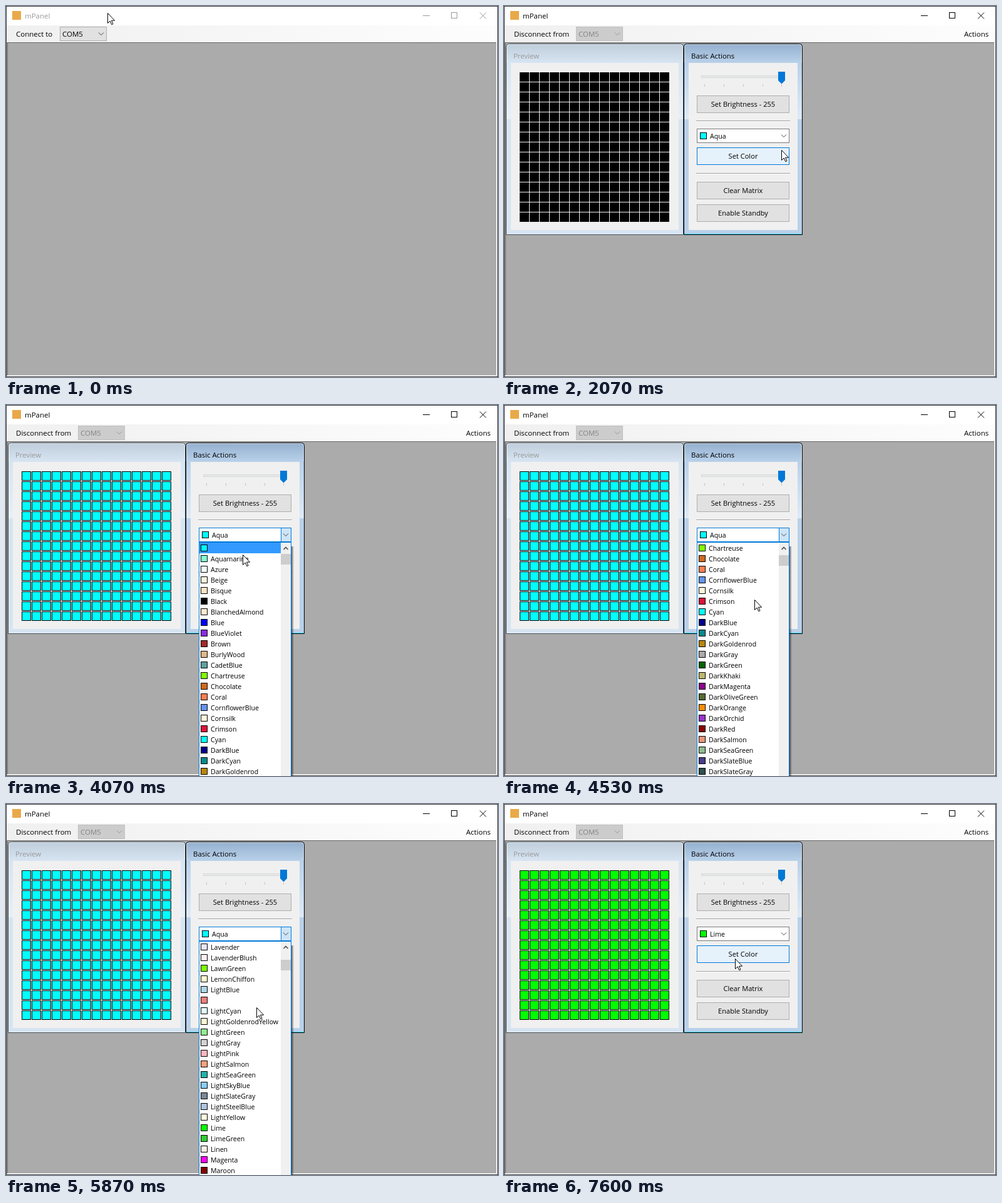
An HTML page for the animation above (8 s loop, 786 by 593 pixels).

```html
<!DOCTYPE html>
<html lang="en">
<head>
<meta charset="utf-8">
<title>mPanel</title>
<style>
html, body { margin: 0; width: 100%; height: 100%; overflow: hidden; background: #ababab; }
svg { display: block; }
body > svg { position: absolute; left: 0; top: 0; }
#drop { left: 308px; top: 219px; }
text { font: 11.5px "Open Sans", "Noto Sans", sans-serif; white-space: pre; }
.btn { font-size: 11.1px; text-anchor: middle; }
.item { font-size: 10.6px; }
.crisp, rect { shape-rendering: crispEdges; }
.line { fill: none; stroke: #444; }

.anim, #pointer, #drop { animation: 8s step-end infinite; }
#caption { animation-name: caption; }
#hover { animation-name: hover; }
#idle { animation-name: idle; }
#ghostB { animation-name: ghostB; }
#ghostA { animation-name: ghostA; }
#live { animation-name: live; }
#leds { animation-name: leds; }
#setColor { animation-name: press; }
#combo { animation-name: combo; }
#arrow { animation-name: arrow; }
#pick { animation-name: pick; }
#oldName { animation-name: oldName; }
#newName { animation-name: newName; }
#drop { animation-name: drop; }
#rows { animation-name: rows; }
#thumb { animation-name: thumb; }
#mark { animation-name: mark; }
#pointer { animation-name: pointer; }

@keyframes caption { 0% { color: #999 } 15.833%, 100% { color: #000 } }
@keyframes hover { 0% { opacity: 0 } 5.833%, 100% { opacity: 1 } }
@keyframes idle { 0% { opacity: 1 } 19.125%, 100% { opacity: 0 } }
@keyframes ghostB { 0% { opacity: 0 } 16.667% { opacity: 1 } 19.125%, 100% { opacity: 0 } }
@keyframes ghostA { 0% { opacity: 0 } 17.4% { opacity: 1 } 19.125%, 100% { opacity: 0 } }
@keyframes live { 0% { opacity: 0 } 19.125%, 100% { opacity: 1 } }
@keyframes leds { 0% { fill: #000 } 37.4% { fill: #0ff } 94.9%, 100% { fill: #0f0 } }
@keyframes press {
  0%, 83.333% { fill: #e1e1e1; stroke: #adadad }
  25.833%, 37.4%, 91.6%, 94.9%, 100% { fill: #e5f1fb; stroke: #0078d7 }
  35.833%, 94.1% { fill: #cce4f7; stroke: #005499 }
  41.667% { fill: #e1e1e1; stroke: #0078d7 }
}
@keyframes combo { 0%, 83.333%, 100% { stroke: #7a7a7a } 42.5% { stroke: #0078d7 } }
@keyframes arrow { 0%, 83.333%, 100% { opacity: 0 } 45% { opacity: 1 } }
@keyframes pick { 0% { fill: #0ff } 83.333%, 100% { fill: #0f0 } }
@keyframes oldName { 0% { opacity: 1 } 83.333%, 100% { opacity: 0 } }
@keyframes newName { 0% { opacity: 0 } 83.333%, 100% { opacity: 1 } }
@keyframes drop {
  0%, 83.333%, 100% { clip-path: inset(0 0 100% 0) }
  44.167% { clip-path: inset(0 0 100% 0); animation-timing-function: steps(5) }
  48.333% { clip-path: inset(0 0 0% 0) }
}
@keyframes rows {
  0% { transform: translateY(0) }
  52.5% { transform: translateY(0); animation-timing-function: steps(10) }
  60.833% { transform: translateY(-510px) }
  64.167% { transform: translateY(-510px); animation-timing-function: steps(9) }
  70%, 100% { transform: translateY(-969px) }
}
@keyframes thumb {
  0% { transform: translateY(0) }
  52.5% { transform: translateY(0); animation-timing-function: steps(5) }
  60.833% { transform: translateY(5px) }
  64.167% { transform: translateY(5px); animation-timing-function: steps(6) }
  70%, 100% { transform: translateY(11px) }
}
@keyframes mark {
  0% { transform: translateY(0); fill: #39f }
  51.667% { transform: translateY(51px); fill: #39f }
  52.5% { transform: translateY(85px); fill: #39f }
  73.333% { transform: translateY(1054px); fill: #fff }
  74.167% { transform: translateY(1088px); fill: #39f }
  75% { transform: translateY(1105px); fill: #39f }
  75.833% { transform: translateY(1139px); fill: #39f }
  76.667% { transform: translateY(1156px); fill: #39f }
  77.5% { transform: translateY(1190px); fill: #39f }
  78.333% { transform: translateY(1207px); fill: #39f }
  79.167% { transform: translateY(1224px); fill: #39f }
  80%, 100% { transform: translateY(1258px); fill: #39f }
}
@keyframes pointer {
  0% { transform: translate(162px, 11px); animation-timing-function: steps(6) }
  5% { transform: translate(88px, 34px); animation-timing-function: steps(6) }
  10% { transform: translate(45px, 47px) }
  18.333% { transform: translate(45px, 47px); animation-timing-function: steps(9) }
  25.833% { transform: translate(443px, 230px); animation-timing-function: steps(4) }
  29.167% { transform: translate(338px, 232px); animation-timing-function: steps(2) }
  30.833% { transform: translate(351px, 238px) }
  39.167% { transform: translate(351px, 238px); animation-timing-function: steps(6) }
  44.167% { transform: translate(440px, 208px) }
  50.833% { transform: translate(378px, 239px); animation-timing-function: steps(3) }
  53.333% { transform: translate(400px, 311px) }
  73.333% { transform: translate(400px, 325px); animation-timing-function: steps(8) }
  80% { transform: translate(398px, 511px) }
  82.5% { transform: translate(398px, 511px); animation-timing-function: steps(6) }
  87.5% { transform: translate(388px, 330px); animation-timing-function: steps(5) }
  91.667%, 100% { transform: translate(369px, 247px) }
}
</style>
</head>
<body>
<svg id="stage" width="786" height="593"></svg>
<svg id="drop" width="152" height="374"></svg>
<svg id="pointer" width="14" height="21">
  <path d="M.5 .5V16.5L4.2 13L6.8 18.7L9 17.7L6.5 12.2H11.6Z" fill="#fff" stroke="#000"/>
</svg>
<script>
const names = `Aqua Aquamarine Azure Beige Bisque Black BlanchedAlmond Blue BlueViolet Brown
  BurlyWood CadetBlue Chartreuse Chocolate Coral CornflowerBlue Cornsilk Crimson Cyan DarkBlue
  DarkCyan DarkGoldenrod DarkGray DarkGreen DarkKhaki DarkMagenta DarkOliveGreen DarkOrange
  DarkOrchid DarkRed DarkSalmon DarkSeaGreen DarkSlateBlue DarkSlateGray DarkTurquoise DarkViolet
  DeepPink DeepSkyBlue DimGray DodgerBlue Firebrick FloralWhite ForestGreen Fuchsia Gainsboro
  GhostWhite Gold Goldenrod Gray Green GreenYellow Honeydew HotPink IndianRed Indigo Ivory Khaki
  Lavender LavenderBlush LawnGreen LemonChiffon LightBlue LightCoral LightCyan
  LightGoldenrodYellow LightGreen LightGray LightPink LightSalmon LightSeaGreen LightSkyBlue
  LightSlateGray LightSteelBlue LightYellow Lime LimeGreen Linen Magenta Maroon`.split(/\s+/);

const rect = (x, y, w, h, fill, extra = '') =>
  `<rect x="${x}" y="${y}" width="${w}" height="${h}" fill="${fill}" ${extra}/>`;
// Box with a one pixel border inside the given bounds
const box = (x, y, w, h, fill, stroke, extra = '') =>
  rect(x + .5, y + .5, w - 1, h - 1, fill, `stroke="${stroke}" ${extra}`);
const label = (x, y, s, extra = '') => `<text x="${x}" y="${y}" ${extra}>${s}</text>`;
const chevron = (x, y, color = '#444') =>
  `<path class="line" d="M${x} ${y}l4 4l4 -4" style="stroke:${color}"/>`;
const button = (y, s, extra) =>
  box(308, y, 148, 28, '#e1e1e1', '#adadad', extra) + label(382, y + 18, s, 'class="btn"');
const rule = y => rect(307, y, 150, 1, '#a0a0a0') + rect(307, y + 1, 150, 1, '#fff');

const shade = (id, top, mid, light) => `<linearGradient id="${id}" x2="0" y2="1">
  <stop stop-color="${top}"/><stop offset=".1" stop-color="${mid}"/>
  <stop offset=".395" stop-color="${light}"/><stop offset=".395" stop-color="${mid}"/>
  <stop offset="1" stop-color="${mid}"/></linearGradient>`;

// Child window; without a client colour the inside stays see-through
function child(x, y, w, title, active, client) {
  const edge = (i, h) => `M${i} ${h}V${5 + i}q0 -5 5 -5H${w - 5 - i}q5 0 5 5V${h}Z`;
  return `<g transform="translate(${x} ${y})">
    <path fill-rule="evenodd" fill="url(#${active ? 'on' : 'off'})"
      d="${edge(0, 306)}M8 31V298H${w - 8}V31Z"/>
    <path d="M1.5 30V6.5q0 -5 5 -5H${w - 6.5}q5 0 5 5V30" fill="none" stroke="#fff" opacity=".6"/>
    ${rect(1, 304, w - 2, 1, active ? '#2fd6f5' : '#e4eef8')}
    <path d="${edge(.5, 305.5)}" fill="none" stroke="${active ? '#000' : '#434e54'}"/>
    ${client ? rect(8, 31, w - 16, 267, client) : ''}
    ${label(12, 24, title, `fill="${active ? '#000' : '#999'}" style="font-size:11.4px"`)}
  </g>`;
}

const ticks = [320, 351, 382, 413, 443].map(x => rect(x, 125, 1, 4, '#c4c4c4')).join('');

const basicActions = child(287, 60, 190, 'Basic Actions', true, '#f0f0f0') +
  box(315, 111, 129, 4, '#e7eaea', '#d6d6d6') + ticks +
  '<path d="M438 105h11v14l-5.5 5.5l-5.5 -5.5z" fill="#0078d7"/>' +
  button(143, 'Set Brightness - 255') + rule(183) +
  box(308, 196, 148, 23, '#fff', '#7a7a7a', 'id="combo" class="anim"') +
  `<g id="arrow" class="anim">${box(439, 196, 17, 23, '#cce4f7', '#0078d7')}</g>` +
  chevron(443, 205.5) +
  box(313, 202, 11, 11, '#0ff', '#000', 'id="pick" class="anim"') +
  label(329, 212, 'Aqua', 'id="oldName" class="item anim"') +
  label(329, 212, 'Lime', 'id="newName" class="item anim"') +
  button(226, 'Set Color', 'id="setColor" class="anim"') + rule(267) +
  button(281, 'Clear Matrix') + button(317, 'Enable Standby');

stage.innerHTML = `<defs>
    ${shade('on', '#93afce', '#b9d1ea', '#deeaf7')}
    ${shade('off', '#bfcddb', '#d7e4f2', '#e8f0f8')}
    <linearGradient id="bar"><stop stop-color="#f0f0f0"/><stop offset="1" stop-color="#fdfdfd"/></linearGradient>
    <pattern id="cells" x="25" y="106" width="16" height="16" patternUnits="userSpaceOnUse">
      ${box(0, 0, 15, 15, 'none', '#000')}
    </pattern>
  </defs>` +
  box(0, 0, 786, 593, '#fff', '#3c3c3c') +
  rect(10, 8, 14, 14, '#e9a94a') +
  `<g id="caption" class="anim">
    ${label(30, 20, 'mPanel', 'fill="currentColor"')}
    <path class="crisp" d="M666 15.5h11M711.5 10.5h9v9h-9z" fill="none" stroke="currentColor"/>
    <path d="M757 10.5l10 10m0 -10l-10 10" fill="none" stroke="currentColor"/>
  </g>` +
  rect(1, 31, 784, 27, 'url(#bar)') +
  rect(1, 58, 784, 534, '#fff') + rect(1, 58, 783, 533, '#a0a0a0') +
  rect(2, 58, 782, 533, '#e3e3e3') + rect(2, 58, 781, 532, '#696969') +
  rect(3, 59, 780, 531, '#ababab') +
  `<g id="idle" class="anim">
    <g id="hover" class="anim">${box(7, 33, 78, 23, '#c0ddf5', '#0078d7')}</g>
    ${label(16, 49, 'Connect to')}
    ${box(86, 33, 75, 23, '#e1e1e1', '#adadad')}
    ${label(90, 49, 'COM5')}${chevron(148, 42.5)}
  </g>
  <g id="ghostB" class="anim">${child(55, 112, 284, 'Preview', true)}</g>
  <g id="ghostA" class="anim">${child(3, 60, 284, 'Preview', true)}</g>
  <g id="live" class="anim">
    ${label(16, 49, 'Disconnect from')}
    ${box(115, 33, 75, 23, '#ccc', '#bfbfbf')}
    ${label(119, 49, 'COM5', 'fill="#838383"')}${chevron(177, 42.5, '#999')}
    ${label(735, 49, 'Actions')}
    ${child(3, 60, 284, 'Preview', false, '#f0f0f0')}
    <g id="leds" class="anim">${Array.from({ length: 225 }, (_, i) =>
      `<rect x="${26 + i % 15 * 16}" y="${107 + (i / 15 | 0) * 16}" width="13" height="13"/>`).join('')}</g>
    ${rect(25, 106, 240, 240, 'url(#cells)')}
    ${basicActions}
  </g>`;

drop.innerHTML = `<defs><linearGradient id="shadow">
    <stop stop-color="#000" stop-opacity=".6"/><stop offset="1" stop-color="#000" stop-opacity="0"/>
  </linearGradient></defs>` +
  rect(148, 7, 4, 367, 'url(#shadow)') +
  rect(0, 0, 148, 374, '#0078d7') + rect(1, 1, 130, 373, '#fff') +
  rect(131, 1, 16, 373, '#f0f0f0') +
  '<path d="M135.5 12l3.5 -3.5l3.5 3.5" fill="none" stroke="#505050" stroke-width="1.6"/>' +
  rect(131, 19, 16, 17, '#cdcdcd', 'id="thumb" class="anim"') +
  `<svg x="1" y="1" width="130" height="373"><g id="rows" class="anim">
    ${names.map((s, i) => label(18, 13 + 17 * i, s, 'class="item"')).join('')}
    ${rect(0, 0, 130, 17, '#39f', 'id="mark" class="anim"')}
    ${names.map((s, i) => box(2, 3 + 17 * i, 11, 11, s.toLowerCase(), '#000')).join('')}
  </g></svg>`;
</script>
</body>
</html>
```
